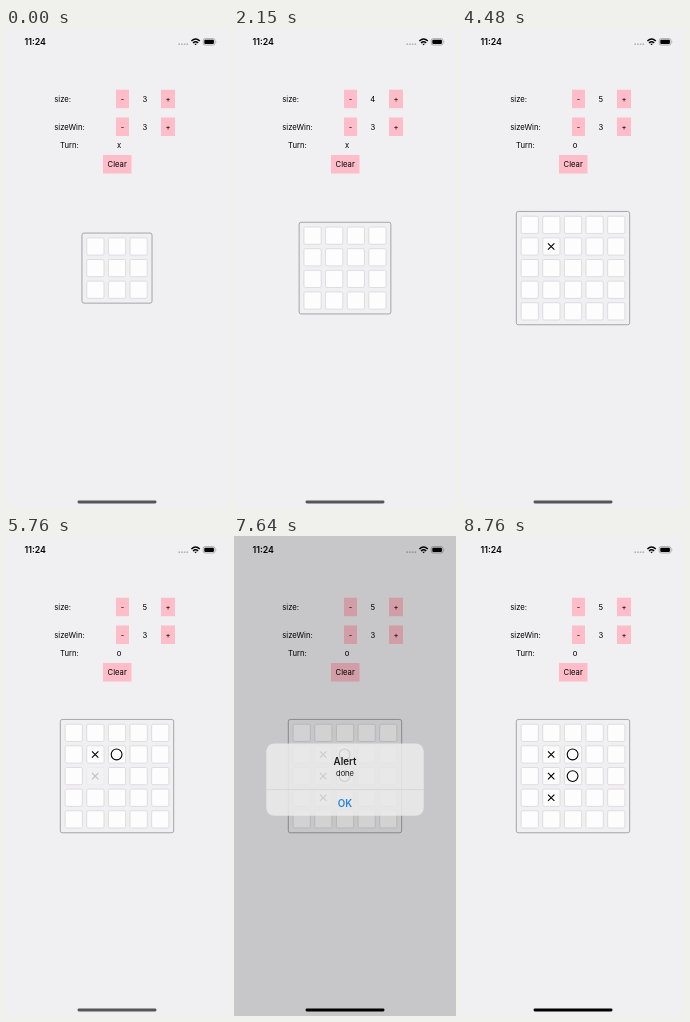
Recreate the animation shown at these times as an HTML page. Size 222 px wide and 480 px high, loop 8.85 s.

```html
<!DOCTYPE html>
<html lang="en">
<head>
<meta charset="utf-8">
<title>Tic-tac-toe</title>
<style>
  html, body { margin: 0; width: 100%; height: 100%; overflow: hidden; background: #f0eff1; }
  svg { display: block; width: 222px; height: 480px; }
  text { font: 7.7px Inter, Roboto, sans-serif; fill: #000; }
  .mid { text-anchor: middle; }
  .bold { font-weight: 600; }
  .button { fill: #febdc8; }
  .cell { fill: #fdfdfe; stroke: #d3d2d4; stroke-width: .7; }
  .mark { fill: none; stroke: #000; stroke-width: 1.1; }
</style>
</head>
<body>
<svg viewBox="0 0 222 480">
  <rect width="222" height="480" fill="#f0eff1"/>
  <text class="bold" x="18.5" y="17.3" style="font-size:8.8px">11:24</text>
  <g fill="#b4b4b6">
    <circle cx="173.2" cy="16.2" r=".9"/><circle cx="175.9" cy="16.2" r=".9"/>
    <circle cx="178.6" cy="16.2" r=".9"/><circle cx="181.3" cy="16.2" r=".9"/>
  </g>
  <g fill="none" stroke="#000" stroke-width="1.4">
    <path d="M185.4 13.1Q189.6 9 193.8 13.1M187 14.9Q189.6 12.4 192.2 14.9"/>
    <path d="M188.2 15.8h2.8l-1.4 1.5z" fill="#000" stroke="none"/>
  </g>
  <rect x="197.2" y="10.7" width="11.8" height="6.3" rx="1.9" fill="none" stroke="#8d8d8f" stroke-width=".7"/>
  <rect x="198.3" y="11.8" width="9.6" height="4.1" rx="1"/>
  <path d="M209.9 12.8q1 1 0 2z" fill="#8d8d8f"/>

  <text x="48.3" y="73.8">size:</text>
  <text x="48.3" y="101.6">sizeWin:</text>
  <text x="54" y="120.3">Turn:</text>
  <text class="mid" id="size" x="138.8" y="73.8">3</text>
  <text class="mid" x="138.8" y="101.6">3</text>
  <text class="mid" id="turn" x="113" y="120.3">x</text>
  <g><rect class="button" x="110" y="61.7" width="13" height="18.5"/><text class="mid" x="116.5" y="73.8">-</text></g>
  <g id="plus"><rect class="button" x="155" y="61.7" width="14" height="18.5"/><text class="mid" x="162" y="73.8">+</text></g>
  <g><rect class="button" x="110" y="89.5" width="13" height="18.5"/><text class="mid" x="116.5" y="101.6">-</text></g>
  <g><rect class="button" x="155" y="89.5" width="14" height="18.5"/><text class="mid" x="162" y="101.6">+</text></g>
  <g><rect class="button" x="97" y="127" width="28.5" height="18.5"/><text class="mid" x="111.2" y="139">Clear</text></g>

  <g id="board"></g>
  <rect id="dim" width="222" height="480"/>
  <rect id="home" x="71.5" y="472.5" width="79" height="2.9" rx="1.45"/>
  <g id="alert">
    <clipPath id="round"><rect x="34.2" y="208.3" width="153.6" height="70.6" rx="8"/></clipPath>
    <g clip-path="url(#round)">
      <rect x="34" y="208" width="154" height="71" fill="#ececed"/>
      <rect id="pressed" x="34" y="253.5" width="154" height="26" fill="#d6d7d9"/>
      <path d="M34 253.4h154" stroke="#c9c9cb" stroke-width=".5"/>
    </g>
    <text class="mid bold" x="111" y="229" style="font-size:9.5px">Alert</text>
    <text class="mid" x="111" y="240.4" style="font-size:7.3px">done</text>
    <text class="mid bold" x="111" y="270.2" style="font-size:9.5px;fill:#0b78e3">OK</text>
  </g>
</svg>
<script>
const LOOP = 8850, PITCH = 21.63, CX = 111, CY = 240.1;
const $ = id => document.getElementById(id);
const clamp = v => Math.max(0, Math.min(1, v));
const progress = (t, start, end) => clamp((t - start) / (end - start));
const inOut = p => p < .5 ? 2 * p * p : 1 - 2 * (1 - p) ** 2;
const out = p => 1 - (1 - p) ** 3;

// [time, column, row]; x and o alternate
const moves = [[4270, 1, 1], [4970, 2, 1], [5760, 1, 2], [6480, 2, 2], [7420, 1, 3]];
const taps = [[1760, 1940], [2670, 2820]];

const release = (t, start) => .2 + .8 * inOut(progress(t, start, start + 230));

function mark(i, x, y) {
  return i % 2
    ? `<circle class="mark" cx="${x - .4}" cy="${y}" r="5.4"/>`
    : `<path class="mark" d="M${x - 3.4} ${y - 3.2}l6.4 6.4m0-6.4l-6.4 6.4"/>`;
}

function board(n, t) {
  const side = n * PITCH + 5.2;
  let svg = `<rect x="${CX - side / 2}" y="${CY - side / 2}" width="${side}" height="${side}" rx="2" fill="none" stroke="#939295" stroke-width=".8"/>`;
  for (let k = 0; k < n * n; k++) {
    const col = k % n, row = Math.floor(k / n);
    const x = CX + (col - (n - 1) / 2) * PITCH, y = CY + (row - (n - 1) / 2) * PITCH;
    const i = moves.findIndex(m => t >= m[0] && m[1] === col && m[2] === row);
    svg += `<g opacity="${i < 0 ? 1 : release(t, moves[i][0])}">
      <rect class="cell" x="${x - 8.6}" y="${y - 8.6}" width="17.2" height="17.2" rx="1.5"/>${i < 0 ? "" : mark(i, x, y)}</g>`;
  }
  return svg;
}

function draw(t) {
  const n = 3 + taps.filter(tap => t >= tap[1]).length;
  const tap = taps.filter(tap => t >= tap[0]).pop();
  $("size").textContent = n;
  $("plus").setAttribute("opacity", tap ? release(t, tap[1]) : 1);
  $("turn").textContent = "xo"[moves.filter(m => t >= m[0]).length % 2];
  $("board").innerHTML = board(n, t);

  const show = progress(t, 7450, 7850), hide = 1 - inOut(progress(t, 8350, 8750));
  const shown = out(show) * hide, scale = 1.18 - .18 * out(show);
  $("dim").setAttribute("opacity", .2 * shown);
  $("home").setAttribute("fill", t < 7420 ? "#565558" : "#000");
  $("alert").setAttribute("opacity", shown);
  $("alert").setAttribute("transform", `translate(111 243.6) scale(${scale}) translate(-111 -243.6)`);
  $("pressed").setAttribute("opacity", t < 8330 ? 0 : 1);
}

const begin = performance.now();
function tick(now) {
  draw(Math.max(0, now - begin) % LOOP);
  requestAnimationFrame(tick);
}
draw(0);
requestAnimationFrame(tick);
</script>
</body>
</html>
```
